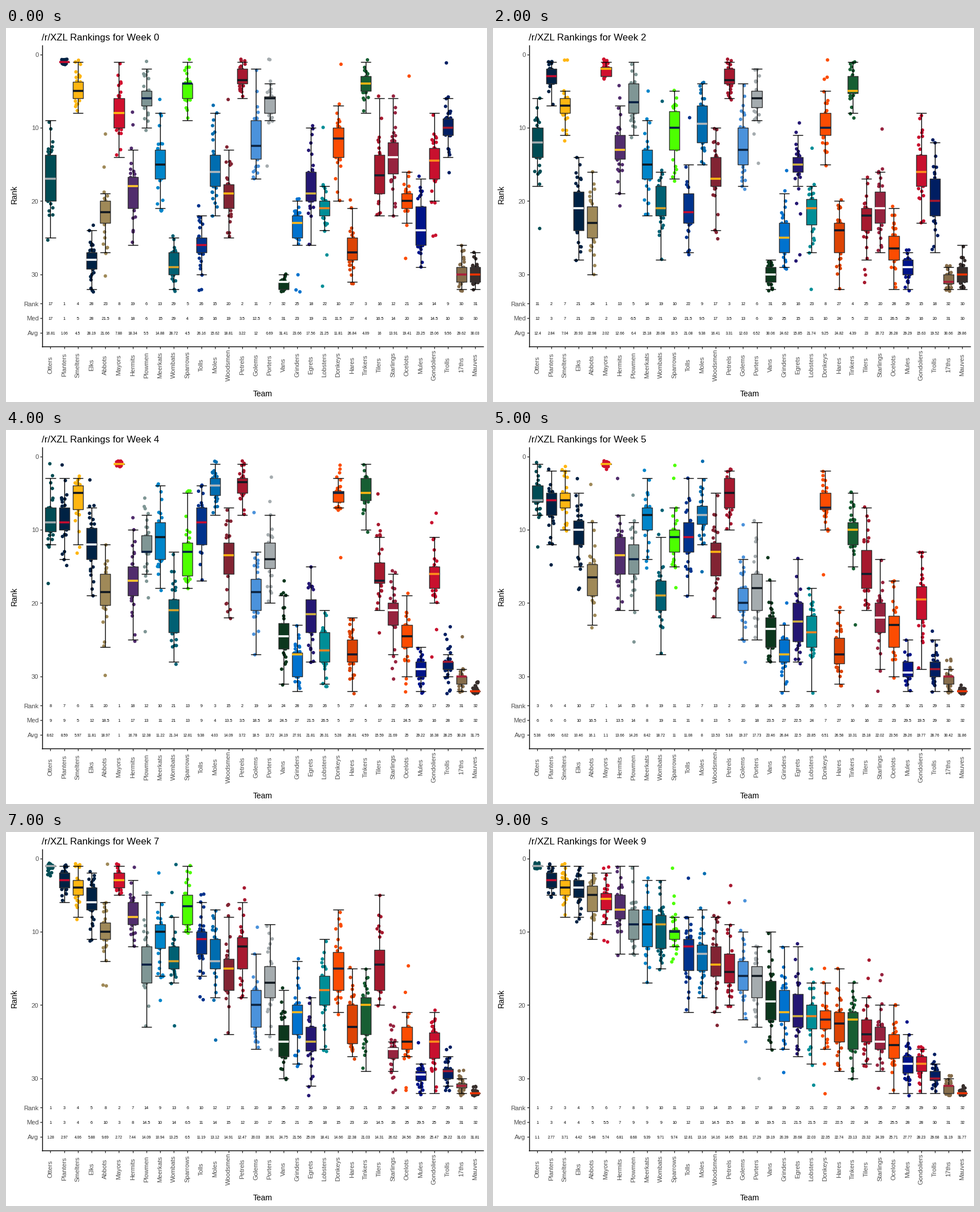
A matplotlib script for the animation above (10 s loop, 849 by 660 pixels).

```python
import numpy as np
import matplotlib.pyplot as plt
from matplotlib.animation import FuncAnimation
from matplotlib.collections import LineCollection, PolyCollection

W, H, DPI = 849, 660, 100
PX = 72 / DPI
VOTERS, LAST = 32, 32
SPREAD = 3.7
SANS = "Liberation Sans"
GREY = "#4D4D4D"
INK, WHITE, GOLD, RED = "#101820", "#FFFFFF", "#FFB612", "#C60C30"
KEY_WEEKS = [0, 1, 3, 4, 6, 7, 9]
teams = []


def team(name, fill, mid, *avg):
    """A team's colours and its mean rank at each key week."""
    teams.append((name, fill, mid, avg))


team("Otters", "#004C54", "#A5ACAF", 16.81, 14.03, 10.77, 8.62, 2.13, 1.28, 1.1)
team("Planters", "#002244", RED, 1.06, 2.53, 3.16, 8.59, 5.32, 2.97, 2.77)
team("Smelters", GOLD, INK, 4.5, 5.97, 8.1, 5.97, 6.06, 4.06, 3.71)
team("Elks", "#002244", WHITE, 28.19, 22.83, 19.03, 11.81, 9.1, 5.88, 4.42)
team("Abbots", "#9F8958", INK, 21.66, 24.3, 21.65, 18.97, 13.23, 9.69, 5.48)
team("Mayors", "#D0102E", GOLD, 7.88, 2.87, 1.16, 1, 1.19, 2.72, 5.74)
team("Hermits", "#512D6D", "#FFC62F", 18.34, 13.5, 11.81, 16.78, 10.55, 7.44, 6.81)
team("Plowmen", "#7F9695", "#041E42", 5.5, 5.07, 7.74, 12.38, 16.13, 14.09, 8.68)
team("Meerkats", "#0085CA", INK, 14.88, 13.03, 17.32, 11.22, 5.61, 10.94, 9.39)
team("Wombats", "#006073", "#D7A22A", 28.72, 22.67, 17.48, 21.34, 16.1, 13.25, 9.71)
team("Sparrows", "#4DFF00", "#002244", 4.5, 7.13, 13.87, 12.81, 9.19, 6.5, 9.74)
team("Tolls", "#00338D", RED, 26.16, 23.7, 18.45, 9.38, 12.77, 11.19, 12.81)
team("Moles", "#006DB0", "#B0B7BC", 15.62, 11.57, 7.19, 4.03, 11.97, 13.12, 13.16)
team("Woodsmen", "#822433", GOLD, 18.81, 20.53, 12.29, 14.09, 12.97, 14.91, 14.16)
team("Petrels", "#A71930", INK, 3.22, 4.33, 2.29, 3.72, 6.65, 12.47, 14.65)
team("Golems", "#4B92DB", "#0C2340", 12, 15.1, 10.16, 18.5, 20.23, 20.03, 15.81)
team("Porters", "#A5ACAF", INK, 6.69, 6.27, 6.77, 13.72, 21.74, 16.91, 17.29)
team("Vans", "#0C371D", WHITE, 31.41, 31.23, 28.9, 24.19, 22.74, 24.75, 19.19)
team("Grinders", "#0072CE", "#FFB81C", 23.66, 22.17, 27.06, 27.91, 25.77, 21.56, 20.39)
team("Egrets", "#241773", "#D0B240", 17.56, 13.47, 18.23, 21.81, 23.19, 25.09, 20.68)
team("Lobsters", "#008E97", "#F58220", 21.25, 19.63, 23.84, 26.31, 21.39, 18.41, 22.03)
team("Donkeys", "#FC4C02", "#0A2343", 11.81, 10.97, 7.52, 5.28, 7.74, 14.66, 22.35)
team("Hares", "#DC4405", "#0B162A", 26.84, 25.03, 24.61, 26.81, 26.35, 22.38, 22.74)
team("Tinkers", "#175E33", GOLD, 4.09, 2.97, 5.81, 4.59, 16.03, 21.03, 23.13)
team("Tilers", "#A6192E", "#091F2C", 16, 24.87, 21.13, 15.59, 14.77, 14.31, 23.32)
team("Starlings", "#97233F", WHITE, 13.91, 19.33, 22.1, 21.69, 22.35, 26.62, 24.39)
team("Ocelots", "#FC4C02", INK, 19.41, 25.07, 27.48, 25, 22.13, 24.56, 25.71)
team("Mules", "#001489", WHITE, 23.25, 29.9, 28.68, 29.22, 29.29, 29.66, 27.77)
team("Gondoliers", "#C8102E", "#FF8F1C", 15.06, 15.07, 16.19, 16.38, 23.16, 25.47, 28.23)
team("Trolls", "#001E62", "#A6192E", 9.56, 14.03, 25, 28.25, 29.26, 29.22, 29.68)
team("17ths", "#866D4B", "#AA1F3A", 29.62, 30.57, 30.74, 30.28, 30.57, 31.03, 31.19)
team("Mauves", "#382F2D", "#EB3300", 30.03, 28.27, 31.45, 31.75, 31.97, 31.81, 31.77)


def px(i):
    return 78.5 + 24.19 * np.asarray(i)


def py(rank):
    return 46.6 + 12.935 * np.asarray(rank)


def ballots(avg, rng):
    """Whole-number votes around a mean; opinions differ most in mid-table."""
    z = rng.standard_t(5, VOTERS)
    z = (z - z.mean()) / z.std()
    t = (avg - 1) / (LAST - 1)
    sd = SPREAD * (4 * t * (1 - t)) ** .7
    return np.clip(np.round(avg + sd * z), 1, LAST)


def box_stats(votes):
    """Whisker ends within 1.5 box heights, and the quartiles."""
    q1, med, q3 = np.percentile(votes, [25, 50, 75])
    reach = 1.5 * (q3 - q1)
    inside = votes[(votes >= q1 - reach) & (votes <= q3 + reach)]
    return inside.min(), q1, med, q3, inside.max()


fig = plt.figure(figsize=(W / DPI, H / DPI), dpi=DPI, facecolor="white")
ax = fig.add_axes([0, 0, 1, 1])
ax.set_xlim(0, W)
ax.set_ylim(H, 0)
ax.axis("off")


def label(x, y, s, size, color="black", **kw):
    kw = {"ha": "center", "va": "baseline", **kw}
    return ax.text(x, y, s, fontsize=size * PX, color=color, family=SANS, **kw)


def segments(segs, color, width, z):
    lines = LineCollection(segs, colors=color, linewidths=width * PX,
                           capstyle="butt", zorder=z)
    return ax.add_collection(lines, autolim=False)


HALF = .375 * 24.19
ticks = {0: "0", 10: "10", 20: "20", 30: "30", 34: "Rank", 36: "Med", 38: "Avg"}
xs = px(range(len(teams)))
segments([[(64, 30), (64, 562.6)], [(63.4, 562), (843, 562)]], "black", 1.4, 1)
segments([[(60.4, py(r)), (64, py(r))] for r in ticks]
         + [[(x, 562), (x, 565.8)] for x in xs], "#333333", 1.4, 1)
for r, s in ticks.items():
    label(57.5, py(r) + 4.2, s, 11.3, GREY, ha="right")
for x, t in zip(xs, teams):
    label(x, 594.5, t[0], 11.2, GREY, va="center", rotation=90)
label(453, 650, "Team", 14)
label(15, 294, "Rank", 14, va="center", rotation=90)
title = label(63, 22, "", 16.9, ha="left")
cells = [[label(x, py(r) + size * .36, "", size) for x in xs]
         for r, size in [(34, 7.4), (36, 7.4), (38, 6.6)]]
drawn = []


def draw(w):
    while drawn:
        drawn.pop().remove()
    title.set_text(f"/r/XZL Rankings for Week {w}")
    avgs = np.round([np.interp(w, KEY_WEEKS, t[3]) for t in teams], 2)
    places = np.argsort(np.argsort(avgs, kind="stable")) + 1

    stems, caps, boxes, mids, dots = [], [], [], [], []
    for i, (x, avg) in enumerate(zip(xs, avgs)):
        rng = np.random.default_rng(100 * w + i)
        votes = ballots(avg, rng)
        dots.append([x + rng.uniform(-4.84, 4.84, VOTERS),
                     py(votes + rng.uniform(-.4, .4, VOTERS))])
        stats = box_stats(votes)
        lo, q1, med, q3, hi = py(stats)
        l, r = x - HALF, x + HALF
        stems += [[(x, lo), (x, q1)], [(x, q3), (x, hi)]]
        caps += [[(l, y), (r, y)] for y in (lo, hi)]
        boxes.append([(l, q1), (r, q1), (r, q3), (l, q3)])
        mids.append([(l, med), (r, med)])
        for row, v in zip(cells, (places[i], stats[2], avg)):
            row[i].set_text(f"{v:g}")

    fills = [t[1] for t in teams]
    dot_x, dot_y = np.hstack(dots)
    drawn.append(ax.scatter(dot_x, dot_y, s=(6.1 * PX) ** 2,
                            c=np.repeat(fills, VOTERS), linewidths=0, zorder=2))
    drawn.append(segments(caps + stems, "black", 1.4, 3))
    drawn.append(ax.add_collection(PolyCollection(
        boxes, facecolors=fills, edgecolors="#333333", linewidths=1.4 * PX,
        zorder=4), autolim=False))
    drawn.append(segments(mids, [t[2] for t in teams], 3.6, 5))
    return drawn


anim = FuncAnimation(fig, draw, frames=10, interval=1000, repeat=True,
                     repeat_delay=0, blit=False)
plt.show()
```
